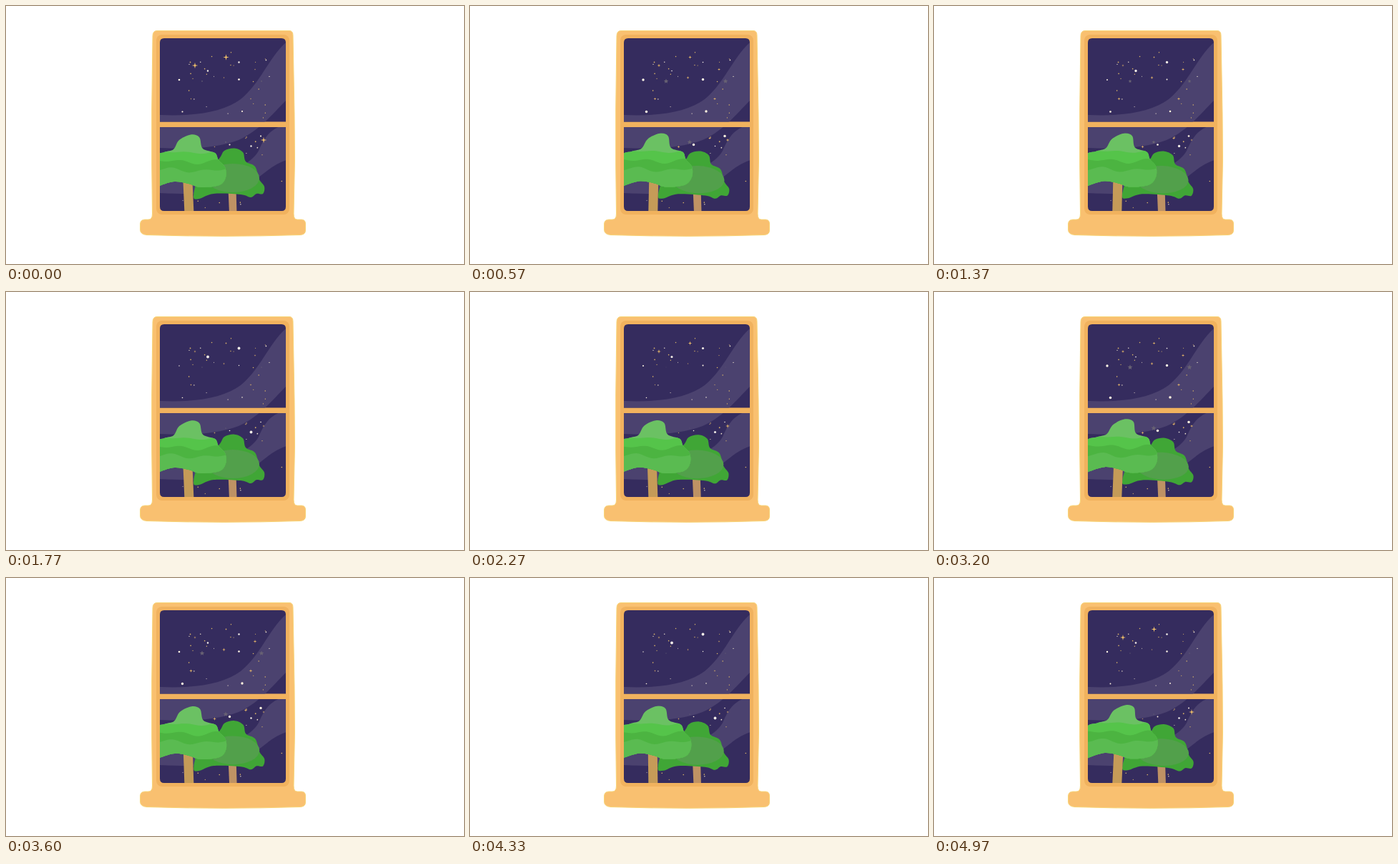
Animation of 640 by 360 pixels, one loop 5070 ms. Source, as an HTML page:

```html
<!DOCTYPE html>
<html lang="en">
<head>
<meta charset="utf-8">
<title>Night window</title>
<style>
  html, body { margin: 0; width: 100%; height: 100%; overflow: hidden; background: #fff; }
  svg { display: block; width: 640px; height: 360px; }
</style>
</head>
<body>
<svg viewBox="0 0 640 360">
  <defs>
    <clipPath id="panes">
      <path d="M215 161.500V51q0-6 6-6H385q6 0 6 6V161.500z"/>
      <path d="M215 169H391V280q0 6-6 6H221q-6 0-6-6z"/>
    </clipPath>
    <clipPath id="leftShape"></clipPath>
  </defs>

  <path fill="#f9c070" stroke="#f8d67a" d="M205 42Q205 34.500 211 34.500H396Q401 34.500 401 41L403 150L403.500 215L402 290Q402 298 407 298H413Q418.500 298 418.500 304V313Q418.500 319.500 410 319.500Q305 323 197 319.500Q187.500 319 187.500 312V304Q188 298 194 298H199Q204.500 298 204.500 290L203.700 220V145Z"/>
  <rect x="210" y="40" width="186" height="251" rx="8" fill="#f1b25e"/>

  <g clip-path="url(#panes)">
    <rect x="214" y="44" width="178" height="244" fill="#352c5e"/>
    <g fill="#4b426f">
      <path d="M214 152C262 154 302 149 328 130C356 107 367 72 392 50V131C372 151 354 174 325 187C293 199 252 200 214 198Z"/>
      <path d="M392 165C368 171 361 184 353 202C340 224 310 237 214 241V261C262 263 304 264 332 252C356 241 366 224 392 215Z"/>
    </g>
    <g id="stars"></g>
    <path id="rightTrunk" fill="#bf9264" d="M310.500 255H321.500L322.500 290H312Z"/>
    <g id="rightLeaves"></g>
    <g id="left">
      <path fill="#c59b58" d="M247.500 245H260.500L262.500 290H249.500Z"/>
      <g id="leftLeaves" clip-path="url(#leftShape)"></g>
    </g>
  </g>
</svg>
<script>
const LOOP = 5070, SWING = 975, TWINKLE = LOOP / 2;
const byId = id => document.getElementById(id);
const points = text => text.split(' ').map(s => s.split(',').map(Number));

function add(parent, tag, attrs) {
  const el = document.createElementNS('http://www.w3.org/2000/svg', tag);
  for (const k in attrs) el.setAttribute(k, attrs[k]);
  byId(parent).append(el);
  return el;
}

// Closed Catmull-Rom outline through a few key points.
function blob(parent, fill, text) {
  const p = points(text), n = p.length;
  const d = p.map((a, i) => {
    const z = p[(i + n - 1) % n], b = p[(i + 1) % n], c = p[(i + 2) % n];
    const c1 = a.map((v, k) => v + (b[k] - z[k]) / 6);
    const c2 = b.map((v, k) => v - (c[k] - a[k]) / 6);
    return `C${c1} ${c2} ${b}`;
  });
  add(parent, 'path', { d: 'M' + p[0] + d.join(''), fill });
}

// Fills everything below a wavy line.
function layer(parent, fill, y, height, shift) {
  let d = 'M200 300';
  for (let x = 200; x <= 320; x += 4)
    d += `L${x} ${y + height * (Math.sin(x / 7 + shift) + Math.sin(x / 13))}`;
  add(parent, 'path', { d: d + 'V300Z', fill });
}

blob('rightLeaves', '#40a636', '297,214 305,202 319,198.5 331,204 335,217 348,224 354,242 361,252 359,262 350,262 342,267 328,263 290,262 270,269 262,266 270,240');
add('rightLeaves', 'ellipse', { cx: 317, cy: 240, rx: 37, ry: 20, fill: '#52a04b' });

blob('leftShape', '#000', '205,212 221,204 234,200 242,187 258,179.5 270,183 275,199 292,205 297,215 306,225 307,239 298,250 272,253 255,248 235,245 214,251 204,255');
add('leftLeaves', 'rect', { x: 200, y: 170, width: 120, height: 90, fill: '#6bc163' });
layer('leftLeaves', '#55c44a', 204, 1.2, 0);
layer('leftLeaves', '#4cb441', 217, 2, 1);
layer('leftLeaves', '#5abb51', 229, 2, 3);

let seed = 11;
const random = () => (seed = seed * 16807 % 2147483647) / 2147483647;

function scatter(count, x, y, w, h) {
  for (let i = 0; i < count; i++)
    add('stars', 'circle', {
      cx: x + w * random(), cy: y + h * random(), r: 0.5 + 0.4 * random(),
      fill: i % 4 ? '#d9b468' : '#eee3cf'
    });
}
scatter(17, 256, 60, 112, 48);
scatter(9, 250, 116, 118, 40);
scatter(10, 305, 170, 82, 75);
scatter(6, 247, 271, 92, 12);

function starPath(tips) {
  const inner = tips === 4 ? 0.27 : 0.45;
  const pts = Array.from({ length: tips * 2 }, (_, i) => {
    const a = i * Math.PI / tips, r = i % 2 ? inner : 1;
    return [Math.sin(a) * r, -Math.cos(a) * r];
  });
  return 'M' + pts.join('L') + 'Z';
}

// Each group swells together; peak is its phase of greatest size.
const twinkles = [];
function twinkle(at, fill, tips, min, max, peak, sharp = 1) {
  const stars = points(at).map(pos => ({
    pos,
    el: tips ? add('stars', 'path', { d: starPath(tips), fill })
             : add('stars', 'circle', { r: 1, fill })
  }));
  twinkles.push({ stars, min, max, peak, sharp });
}
twinkle('264,83 307.5,71.5 360,187', '#f5c469', 4, 1.8, 4.5, 0.04, 4);
twinkle('274,105 357,105 307,190', '#686273', 5, 0.4, 3.8, 0.33);
twinkle('258.5,129.5 342,129.5 348,88.5 304.5,100 291.5,196.5 335,184.5', '#efbd69', 4, 1, 2.5, 0.4);
twinkle('242,103 325.5,102.5', '#fff6e6', 0, 0.7, 1.7, 0.21);
twinkle('246.5,147.5 330,147 356,181.5 312.5,193.5', '#fff3df', 0, 0.7, 1.8, 0.31);
twinkle('282,90.5 325.5,78.5 342.5,195.5', '#f4eee8', 0, 0.8, 1.9, 0.7);

const ease = u => u < 0.5 ? 4 * u ** 3 : 1 - 4 * (1 - u) ** 3;
const move = (id, value) => byId(id).setAttribute('transform', value);

function draw(t) {
  const leg = t / SWING, u = leg % 1;
  const k = ease(Math.floor(leg) % 2 ? 1 - u : u);

  move('left', `translate(0 286) skewX(${-5.2 * k}) scale(1 ${1 + 0.022 * k}) translate(0 -286)`);
  move('rightLeaves', `translate(${285 + k} 266) rotate(${2.6 * k}) scale(1 ${1 - 0.06 * k}) translate(-285 -266)`);
  move('rightTrunk', `translate(${1.5 * k} 0)`);

  for (const { stars, min, max, peak, sharp } of twinkles) {
    const wave = (1 + Math.cos(2 * Math.PI * (t / TWINKLE - peak))) / 2;
    const size = min + (max - min) * wave ** sharp;
    for (const { el, pos } of stars)
      el.setAttribute('transform', `translate(${pos}) scale(${size})`);
  }
}

const start = performance.now();
function tick() {
  draw((performance.now() - start) % LOOP);
  requestAnimationFrame(tick);
}
draw(0);
requestAnimationFrame(tick);
</script>
</body>
</html>
```
